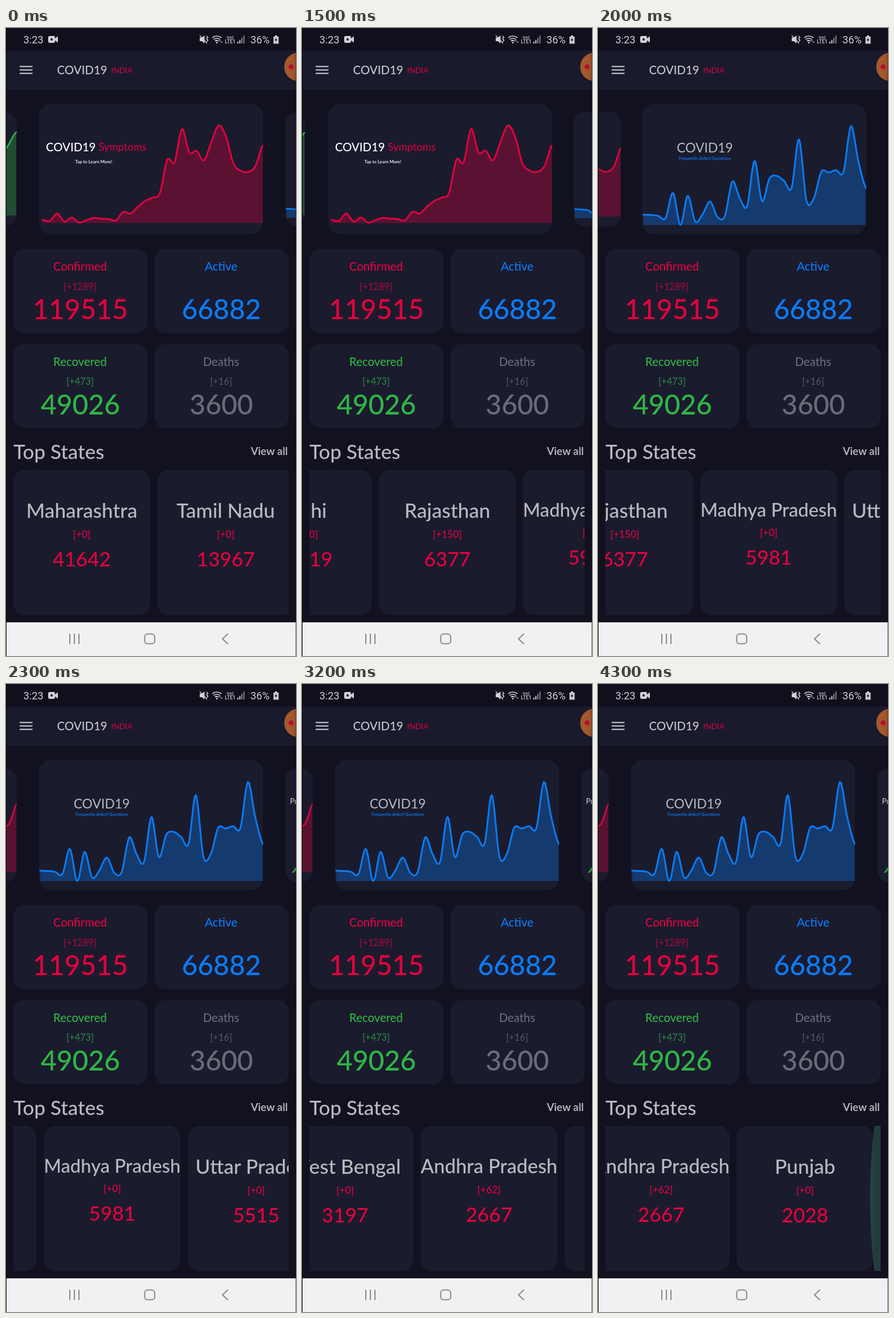
An HTML page for the animation above (4400 ms loop, 509 by 1100 pixels).

```html
<!DOCTYPE html>
<html lang="en">
<head>
<meta charset="utf-8">
<title>COVID19 India dashboard</title>
<style>
  html, body { margin: 0; height: 100%; overflow: hidden; background: #000; }
  svg { display: block; width: 100vw; height: 100vh; }
  text { font-family: Lato, sans-serif; font-weight: 500; white-space: pre; }
  .sys text { font-family: Roboto, sans-serif; font-weight: 400; }
</style>
</head>
<body>
<svg id="stage" viewBox="0 0 509 1100">
  <defs>
    <clipPath id="listClip"><rect x="13" y="770" width="483" height="262"/></clipPath>
    <clipPath id="screen"><rect x="1" width="507.5" height="1100"/></clipPath>
    <clipPath id="cardClip"><rect x="57.5" y="133" width="394" height="228.5" rx="22"/></clipPath>
    <linearGradient id="bubble" x2="1"><stop stop-color="#a95c2e"/><stop offset="1" stop-color="#8d4a28"/></linearGradient>
  </defs>
  <g clip-path="url(#screen)">
    <rect width="509" height="1041" fill="#12111f"/>
    <g id="carousel"></g>
    <g id="stats"></g>
    <g clip-path="url(#listClip)">
      <g id="list"></g>
      <path id="glow" d="M0 774H-11Q-26 901 -11 1028H0Z" fill="#3f9582" opacity=".32"/>
    </g>

    <rect width="509" height="39" fill="#100f1b"/>
    <rect y="39" width="509" height="69" fill="#1a1a2d"/>
    <path d="M24 67.5h22.5M24 73.5h22.5M24 79.5h22.5" stroke="#d2d2d6" stroke-width="2"/>
    <g id="head"></g>
    <circle cx="513" cy="68" r="25" fill="url(#bubble)" stroke="#3a2420"/>
    <circle cx="500.5" cy="68" r="4.5" fill="#b5122b"/>

    <g class="sys" fill="#cfcfd4">
      <text x="30.5" y="27" font-size="18.3">3:23</text>
      <rect x="74" y="14" width="12" height="12" rx="2.5"/>
      <path d="M85 19l6-4.5v11L85 21z"/>
      <circle cx="80" cy="20" r="2" fill="#100f1b"/>
      <path d="M340 17h3.5l5-4v14l-5-4H340z"/>
      <path d="M340 13l13 14M352 14l2.5 2.5-2.5 2.5 2.5 2.5-2.5 2.5" fill="none" stroke="#cfcfd4" stroke-width="1.5"/>
      <path d="M362 17q8-6 16 0M364.500 20q5.500-4 11 0M367 23q3-2.500 6 0" fill="none" stroke="#cfcfd4" stroke-width="1.7"/>
      <circle cx="370" cy="25.500" r="1.500"/>
      <path d="M374 23l1.500-2.500 1.500 2.500zM377 24h3l-1.500 2.500z"/>
      <text x="393.500" y="18.500" font-size="8" text-anchor="middle" style="font-weight:500">Vo)</text>
      <text x="393.500" y="27" font-size="8.500" text-anchor="middle" style="font-weight:500">LTE1</text>
      <path d="M406 24h2v3h-2zM409.500 21h2v6h-2z"/>
      <path d="M413 17h2v10h-2zM416.700 13h2v14h-2z" opacity=".6"/>
      <text x="429" y="27" font-size="18.300">36%</text>
      <path d="M472 13h4v2h2.500v12.500h-9V15h2.500z"/>
      <path d="M475 16l-3.500 5.500h2.500l-1 4 3.500-5.500h-2.500z" fill="#100f1b"/>
    </g>

    <rect y="1041" width="509" height="59" fill="#f2f0f3"/>
    <g fill="none" stroke="#8a898c" stroke-width="2">
      <path d="M112 1061v18M120 1061v18M128 1061v18"/>
      <rect x="243.500" y="1061.500" width="17.500" height="17" rx="5"/>
      <path d="M389.500 1061l-9.500 9 9.500 9"/>
    </g>
  </g>
</svg>
<script>
const $ = id => document.getElementById(id);
const RED = '#e2033d', BLUE = '#0a7cf5', GREEN = '#2fb645', GRAY = '#6b6c78', CARD = '#1b1b2e', LIGHT = '#b9b9bf';

function add(parent, tag, attrs, content) {
  const el = document.createElementNS('http://www.w3.org/2000/svg', tag);
  for (const k in attrs) el.setAttribute(k, attrs[k]);
  if (content) el.textContent = content;
  parent.appendChild(el);
  return el;
}
const text = (g, str, x, y, size, fill, anchor = 'start', weight = 500) =>
  add(g, 'text', { x, y, fill, 'font-size': size, 'text-anchor': anchor, style: `font-weight:${weight}` }, str);
const box = (g, x, y, width, height, rx) => add(g, 'rect', { x, y, width, height, rx, fill: CARD });

// Header and section title
text($('head'), 'COVID19', 89.5, 81, 20.4, '#c6c6cb');
text($('head'), 'INDIA', 184.5, 79, 13.6, '#c5063c');
text($('stats'), 'Top States', 13, 755, 35, LIGHT);
text($('stats'), 'View all', 494.5, 748, 18.7, '#c3c3c8', 'end', 600);

// Four totals
[
  ['Confirmed', '[+1289]', '119515', RED],
  ['Active', '', '66882', BLUE],
  ['Recovered', '[+473]', '49026', GREEN],
  ['Deaths', '[+16]', '3600', GRAY]
].forEach(([label, delta, total, color], i) => {
  const g = add($('stats'), 'g', { transform: `translate(${i % 2 * 247.5} ${(i >> 1) * 166.5})` });
  box(g, 13, 387, 235.5, 147.5, 20);
  text(g, label, 130, 425, 20.3, color, 'middle');
  text(g, delta, 130, 458.5, 16.4, color, 'middle').setAttribute('opacity', .68);
  text(g, total, 130.5, 510, 48, color, 'middle');
});

// State cards; long names shrink to the card width
const PITCH = 252.6, CARD_W = 240;
[
  ['Maharashtra', 0, 41642], ['Tamil Nadu', 0, 13967], ['Gujarat', 0, 12905], ['Delhi', 660, 12319],
  ['Rajasthan', 150, 6377], ['Madhya Pradesh', 0, 5981], ['Uttar Pradesh', 0, 5515],
  ['West Bengal', 0, 3197], ['Andhra Pradesh', 62, 2667], ['Punjab', 0, 2028]
].forEach(([name, delta, total], i) => {
  const x = 13 + i * PITCH, mid = x + CARD_W / 2, size = 35.2;
  box($('list'), x, 774, CARD_W, 254, 20);
  const title = text($('list'), name, mid, 858, size, LIGHT, 'middle');
  const fit = Math.min(1, CARD_W / title.getComputedTextLength());
  const rise = 42 * (1 - fit);
  title.setAttribute('font-size', size * fit);
  title.setAttribute('y', 823.3 + 34.7 * fit);
  text($('list'), `[+${delta}]`, mid, 893 - rise, 17.4, RED, 'middle');
  text($('list'), String(total), mid, 943 - rise, size, RED, 'middle');
});

// Smooth line through evenly spaced heights, with the area below it filled
function chart(g, x0, base, color, ys) {
  const dx = (450.5 - x0) / (ys.length - 1);
  const at = i => ys[Math.max(0, Math.min(ys.length - 1, i))];
  let d = `M${x0} ${ys[0]}`;
  for (let i = 0; i < ys.length - 1; i++) {
    const x = x0 + i * dx;
    d += `C${x + dx / 3} ${at(i) + (at(i + 1) - at(i - 1)) / 6} ${x + dx * 2 / 3} ${at(i + 1) - (at(i + 2) - at(i)) / 6} ${x + dx} ${at(i + 1)}`;
  }
  add(g, 'path', { d: `${d}V${base}H${x0}Z`, fill: color, opacity: .32 });
  add(g, 'path', { d, fill: 'none', stroke: color, 'stroke-width': 3, 'stroke-linecap': 'round' });
}

function symptoms(g) {
  chart(g, 64, 341.5, RED, [336, 338, 325, 339, 332, 341, 336.5, 332.5, 334, 334.5, 337, 322, 325, 313, 303, 297,
    289, 231, 235, 177, 218, 215, 232, 200, 171, 190, 237, 250, 252, 242, 206]);
  text(g, 'COVID19', 70, 216, 20.3, '#fff');
  text(g, 'Symptoms', 162.5, 215, 18.3, '#cc043c');
  text(g, 'Tap to Learn More!', 154, 237, 7.8, '#fff', 'middle', 600);
}
function questions(g) {
  chart(g, 60, 345, BLUE, [327, 327.5, 329, 333, 289, 345, 294, 339, 326, 304, 331, 329, 269, 298, 312, 233,
    303, 264, 259, 268, 280, 195, 302, 298, 252, 253, 249, 252, 172, 233, 280]);
  text(g, 'COVID19', 168, 218, 22.9, '#b9b9c0', 'middle', 400);
  text(g, 'Frequently Asked Questions', 168, 230.5, 7.4, BLUE, 'middle', 600);
}
function prevention(g) {
  chart(g, 73, 340.5, GREEN, [342, 310, 318, 296, 305, 288, 292, 274, 280, 262, 268, 250, 254, 238, 240, 228, 226, 207, 173]);
  text(g, 'Prevention', 67, 205, 15, '#c9c9ce');
}
const slides = [prevention, symptoms, questions, prevention].map(draw => {
  const g = add($('carousel'), 'g', { 'clip-path': 'url(#cardClip)' });
  box(g, 57.5, 133, 394, 228.5, 22);
  draw(g);
  return g;
});

const clamp = v => Math.max(0, Math.min(1, v));
const span = (t, from, to) => clamp((t - from) / (to - from));
function bezier(x1, y1, x2, y2) {
  const f = (a, b, s) => 3 * a * s * (1 - s) ** 2 + 3 * b * s * s * (1 - s) + s ** 3;
  return x => {
    let lo = 0, hi = 1;
    for (let i = 0; i < 24; i++) {
      const m = (lo + hi) / 2;
      if (f(x1, x2, m) < x) lo = m; else hi = m;
    }
    return f(y1, y2, lo);
  };
}
const pageEase = bezier(.4, 0, .2, 1), scaleEase = bezier(0, 0, .58, 1);
const fling = (t, from, to, dist, power) => dist * (1 - (1 - span(t, from, to)) ** power);

function render(t) {
  const page = pageEase(span(t, 1415, 2215));
  slides.forEach((g, i) => {
    const rel = i - 1 - page;
    const s = scaleEase(clamp(1 - .3 * Math.abs(rel)));
    g.setAttribute('transform', `translate(${254.5 + 407.2 * rel} 247.25) scale(${s}) translate(-254.5 -247.25)`);
  });
  const scroll = fling(t, 1000, 2200, 1101, 3.05) + fling(t, 2200, 3300, 738, 1.67) + fling(t, 3900, 4200, 204, 2);
  $('list').setAttribute('transform', `translate(${-scroll} 0)`);
  $('glow').setAttribute('transform', `translate(496 0) scale(${span(t, 4150, 4300)} 1)`);
}

// The screen refreshes ten times a second
const start = performance.now();
(function tick() {
  const t = (performance.now() - start) % 4400;
  render(Math.floor(t / 100) * 100);
  requestAnimationFrame(tick);
})();
</script>
</body>
</html>
```
